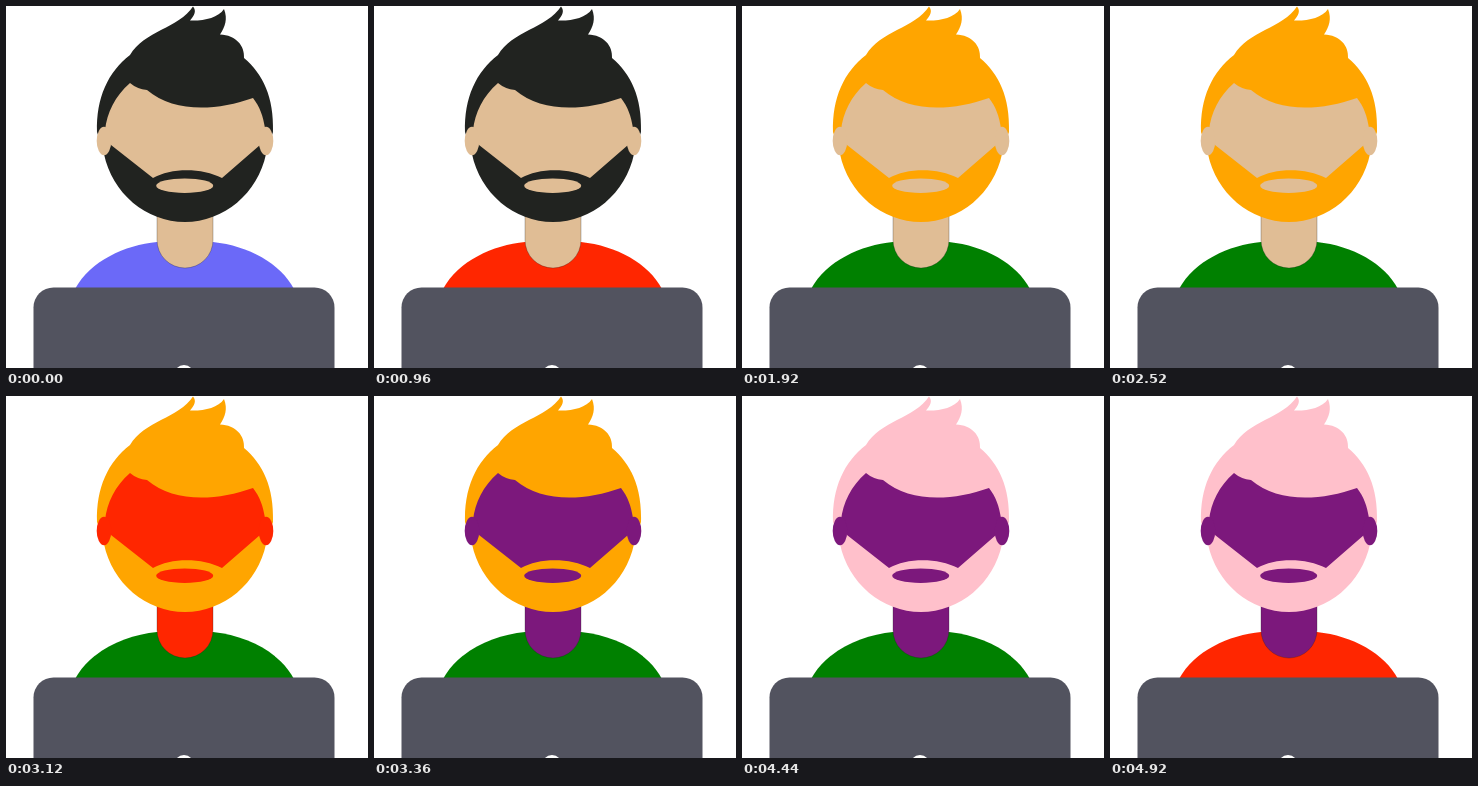
An HTML page for the animation above (5.04 s loop, 362x362 px).

```html
<!DOCTYPE html>
<html lang="en">
<head>
<meta charset="utf-8">
<title>Avatar colours</title>
<style>
  html, body { margin: 0; height: 100%; overflow: hidden; background: #fff; }
  svg { display: block; width: 100vw; height: 100vh; }
  .shirt { fill: var(--shirt); }
  .skin { fill: var(--skin); }
  .hair { fill: var(--hair); }
  .neck { stroke: #222; stroke-opacity: .4; stroke-width: .7; }
</style>
</head>
<body>
<svg viewBox="0 0 362 362">
  <path class="shirt" d="M69 283C84 255 119 239 151 236H207C243 240 274 257 288 283Z"/>
  <path class="skin neck" d="M151 200V234a28 28 0 0 0 56 0V200Z"/>
  <path class="hair" d="M91 126C90 92 102 66 124 49C138 25 173 22 187 0.5C191 5 188 10 184 14.5C198 15 212 12 218 3C222 13 219 21 214 28.5C230 29 239 40 238 52C257 68 268 91 267 126L260 148C252 187 218 216 179 216S106 187 98 148Z"/>
  <path class="skin" d="M124 77C109 90 101 107 99 124L105 139L147 172C165 161.500 196 161.500 216 172L254 139L259 122C257 110 254 101 247 92C210 105 168 107 141 84Q131 83 124 77Z"/>
  <ellipse class="skin" cx="98" cy="135" rx="7.300" ry="14.300"/>
  <ellipse class="skin" cx="260" cy="135" rx="7.300" ry="14.300"/>
  <ellipse class="skin" cx="178.700" cy="179.700" rx="28.500" ry="7.200"/>
  <rect x="27.500" y="281.500" width="301" height="120" rx="20" fill="#52535f"/>
  <circle cx="178" cy="369" r="10" fill="#fff"/>
</svg>
<script>
  const LOOP = 5040;
  // Each step: start time in ms, part, new colour
  const steps = [
    [0, 'shirt', '#6b69f8'],
    [0, 'skin', '#e0bd95'],
    [0, 'hair', '#212320'],
    [720, 'shirt', '#ff2600'],
    [1320, 'shirt', '#008000'],
    [1920, 'hair', '#ffa500'],
    [2640, 'skin', '#ff2600'],
    [3240, 'skin', '#7c187c'],
    [4200, 'hair', '#ffc0cb'],
    [4800, 'shirt', '#ff2600'],
  ];
  const style = document.documentElement.style;

  function draw() {
    const time = performance.now() % LOOP;
    for (const [start, part, colour] of steps) {
      if (time >= start) style.setProperty('--' + part, colour);
    }
    requestAnimationFrame(draw);
  }
  draw();
</script>
</body>
</html>
```
